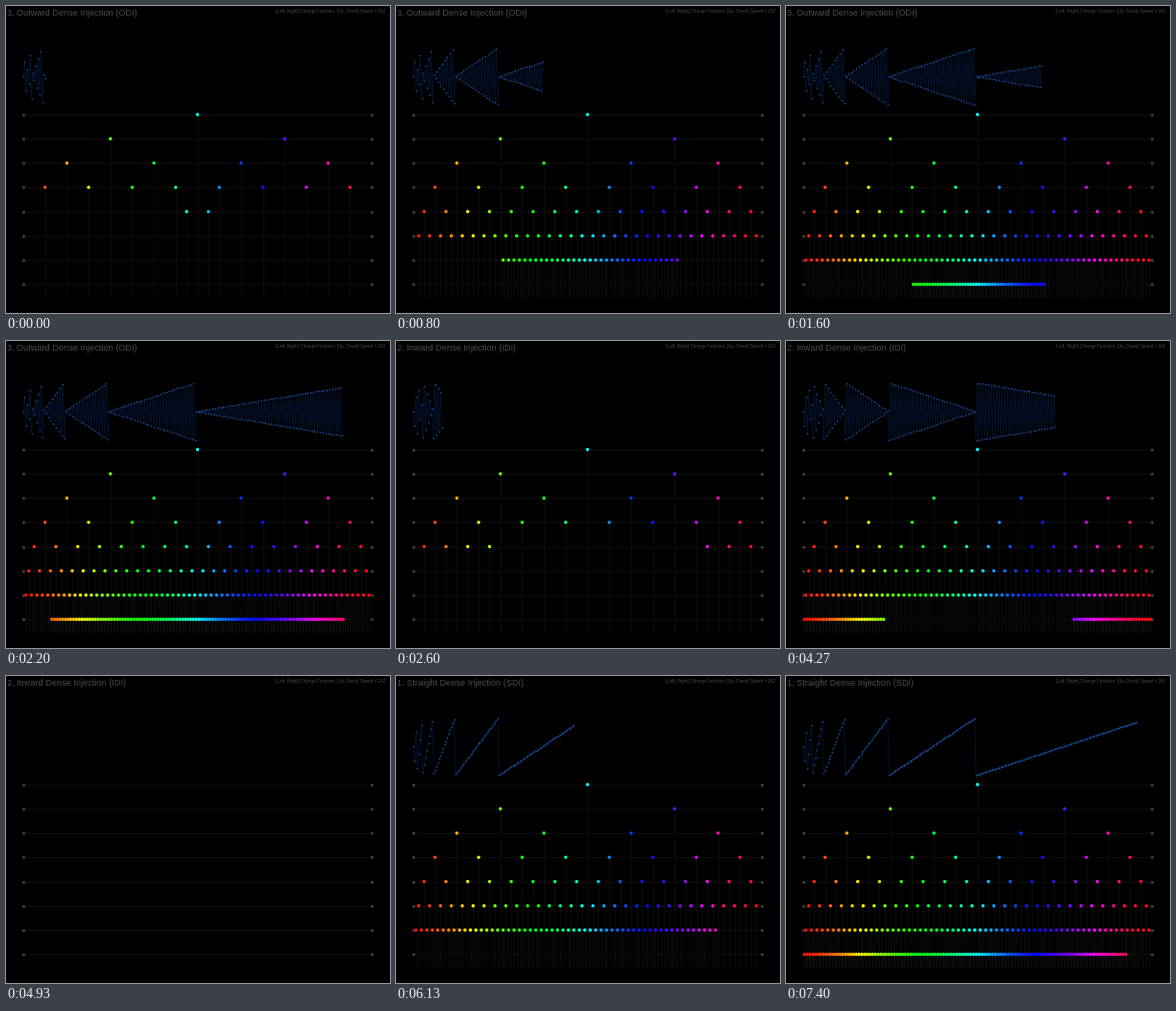
Write a matplotlib script that moves like this. It is 400 px wide and 319 px high and loops after 7.47 s.

```python
import colorsys

import matplotlib.pyplot as plt
import numpy as np
from matplotlib.animation import FuncAnimation
from matplotlib.collections import LineCollection

W, H, DPI = 400, 319, 100
LOOP, TICK, STEPS = 7470, 30, 112
LEVELS = 8
LEFT, SPAN = 18, 363
TOP, ROW = 112.8, 25.2
FLOOR = 303
WAVE_LOW, WAVE_RISE = 103.3, 60


def px(n):
    return n * 72 / DPI


def rainbow(v):
    """Hue by position, drawn slightly towards red, green and blue."""
    hue = v - 0.02 * np.sin(6 * np.pi * v)
    return colorsys.hsv_to_rgb(hue % 1, 0.96, 0.97)


def straight(n):
    return list(range(n))


def inward(n):
    return [i // 2 if i % 2 == 0 else n - 1 - i // 2 for i in range(n)]


def outward(n):
    return inward(n)[::-1]


class Sequence:
    """All points of the binary tree in the order one rule injects them."""

    def __init__(self, title, order, first, at, rate):
        self.title, self.first, self.at, self.rate = title, first, at, rate
        spots = [(lv, (2 * k + 1) / 2 ** (lv + 1))
                 for lv in range(LEVELS) for k in order(2 ** lv)]
        level, v = np.array(spots).T
        x = LEFT + SPAN * v
        y = TOP + ROW * level
        i = np.arange(len(v))
        self.dots = np.column_stack([x, y])
        self.colors = np.array([rainbow(h) for h in v])
        self.stems = [[(a, b), (a, FLOOR)] for a, b in zip(x, y)]
        self.wave = np.column_stack([LEFT + i * SPAN / 256,
                                     WAVE_LOW - WAVE_RISE * v])

    def count(self, step):
        n = int(self.first + self.rate * (step - self.at) + 0.01)
        return min(max(n, 0), len(self.dots))


SEQS = [
    Sequence("3. Outward Dense Injection (ODI)", outward, 17, 0, 6.63),
    Sequence("2. Inward Dense Injection (IDI)", inward, 22, 39, 6.58),
    Sequence("1. Straight Dense Injection (SDI)", straight, 119, 92, 6.69),
]
CLEARED = (36, 74)  # each rule ends on one empty screen

fig = plt.figure(figsize=(W / DPI, H / DPI), dpi=DPI, facecolor="black")
ax = fig.add_axes([0, 0, 1, 1])
ax.set(xlim=(0, W), ylim=(H, 0))
ax.axis("off")

rows = TOP + ROW * np.arange(LEVELS)
ax.hlines(rows, LEFT, LEFT + SPAN, colors="#0d0d0d", lw=px(1), zorder=1)
for end in (LEFT, LEFT + SPAN):
    ax.scatter([end] * LEVELS, rows, s=px(3.3) ** 2, c="#383838", lw=0, zorder=3)

stems = ax.add_collection(LineCollection([], colors="#0b0b0b", lw=px(1), zorder=1))
dots = ax.scatter([], [], s=px(3.5) ** 2, lw=0, zorder=4)
wave, = ax.plot([], [], color="#03132f", lw=px(0.9), zorder=2)
marks, = ax.plot([], [], ls="", marker="o", ms=px(1.7), mew=0,
                 color="#1a4b98", zorder=3)

title = ax.text(1, 10, "", family="Liberation Sans", size=px(9.1),
                color="#4c4c4c", va="baseline")
ax.text(395.5, 7.2, "[Left, Right] Change Function, [Up, Down] Speed = 262",
        family="Liberation Sans", size=px(4.6), color="#464646",
        ha="right", va="baseline")


def draw(frame):
    step = int((frame * TICK + 27) * STEPS / LOOP)
    seq = SEQS[sum(step > c for c in CLEARED)]
    n = 0 if step in CLEARED else seq.count(step)
    title.set_text(seq.title)
    dots.set_offsets(seq.dots[:n])
    dots.set_facecolors(seq.colors[:n])
    stems.set_segments(seq.stems[:n])
    for line in (wave, marks):
        line.set_data(*seq.wave[:n].T)
    return title, dots, stems, wave, marks


anim = FuncAnimation(fig, draw, frames=LOOP // TICK, interval=TICK,
                     repeat=True, repeat_delay=0)
plt.show()
```
